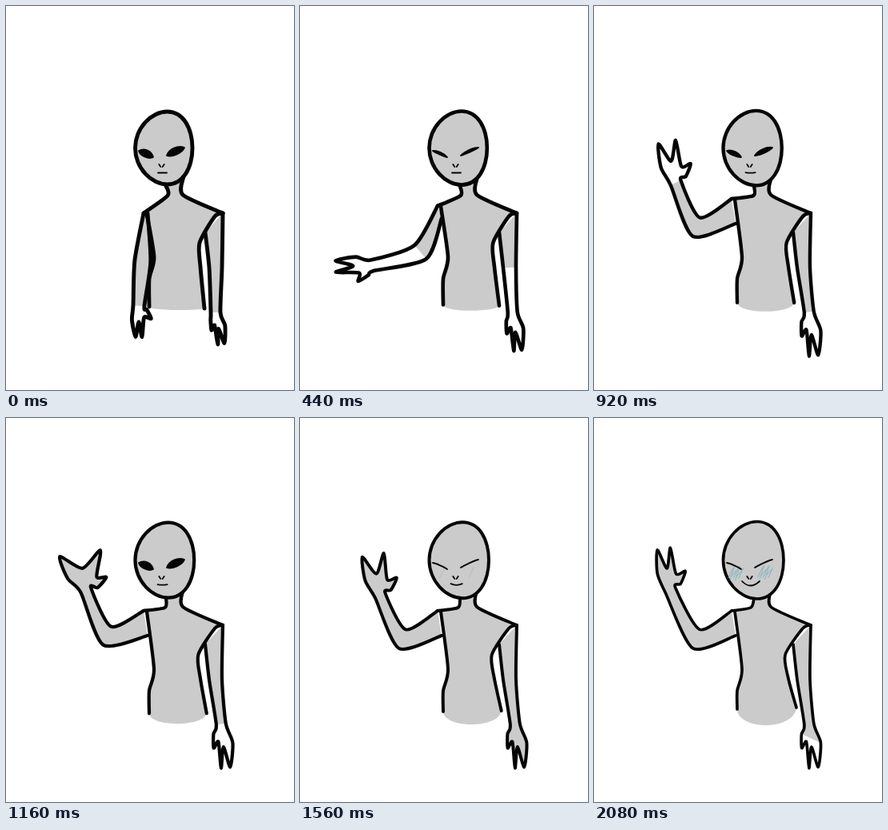
Recreate the animation shown at these times as an HTML page with a canvas. Size 360 by 480 pixels, loop 2.16 s.

```html
<!DOCTYPE html>
<html lang="en">
<head>
<meta charset="utf-8">
<title>Waving alien</title>
<style>
html, body { margin: 0; width: 100%; height: 100%; overflow: hidden; background: #fff; }
canvas { display: block; }
</style>
</head>
<body>
<canvas id="stage" width="360" height="480"></canvas>
<script>
const g = document.getElementById('stage').getContext('2d');
const LOOP = 2160, SKIN = '#cbcbcb', INK = '#050505';
// Where the white of an arm starts, counted along its outline.
const ELBOW = 1, WRIST = 2, FINGERS = 3, NONE = 99;

// Each drawing is held until the next step.
const steps = [0];
for (let t = 120; t < 280; t += 40) steps.push(t);
for (let t = 280; t <= 1640; t += 80) steps.push(t);
for (let t = 1680; t < 1760; t += 40) steps.push(t);
for (let t = 1760; t <= 2080; t += 80) steps.push(t);

// Angles in degrees: upper arm, forearm, hand; reach is the forearm length.
const keys = [
  { t: 0, upper: 92, fore: 95, reach: 56, hand: 90, spread: 6, open: 5, smile: 0, pale: [WRIST, WRIST] },
  { t: 280, upper: 95, fore: 117, reach: 54, hand: 100, spread: 9, open: 3.2, smile: 0, pale: [ELBOW, ELBOW] },
  { t: 600, upper: 133, fore: 212, reach: 71, hand: 257, spread: 9, open: 0, smile: 0, pale: [FINGERS, FINGERS] },
  { t: 920, upper: 157, fore: 245, reach: 61, hand: 258, spread: 12, open: 3, smile: .1, pale: [WRIST, WRIST] },
  { t: 1160, upper: 162, fore: 245, reach: 63, hand: 261, spread: 29, open: 5, smile: .1, pale: [NONE, WRIST] },
  { t: 1560, upper: 157, fore: 243, reach: 61, hand: 260, spread: 15, open: 0, smile: .3, pale: [NONE, NONE] },
  { t: 1760, upper: 162, fore: 245, reach: 63, hand: 261, spread: 29, open: 0, smile: .55, pale: [NONE, FINGERS] },
  { t: 2080, upper: 157, fore: 242, reach: 69, hand: 261, spread: 9, open: 0, smile: 1, pale: [NONE, FINGERS] }
];

const lerp = (a, b, k) => a + (b - a) * k;

function poseAt(t) {
  let i = 0;
  while (i < keys.length - 2 && t >= keys[i + 1].t) i++;
  const a = keys[i], b = keys[i + 1], k = (t - a.t) / (b.t - a.t);
  const p = { pale: k < 1 ? a.pale : b.pale };
  for (const n in a) if (n !== 'pale') p[n] = lerp(a[n], b[n], k);
  p.drift = t / 2080;
  p.lift = Math.sin(Math.min(1, (p.upper - 92) / 65) * Math.PI / 2);
  return p;
}

function polar([x, y], angle, r) {
  const a = angle * Math.PI / 180;
  return [x + r * Math.cos(a), y + r * Math.sin(a)];
}

// Smooth path through points.
function curve(path, pts, closed, join) {
  const n = pts.length;
  const at = i => closed ? pts[(i + n) % n] : pts[Math.max(0, Math.min(n - 1, i))];
  const s = closed ? 6 : 8;
  path[join ? 'lineTo' : 'moveTo'](...pts[0]);
  for (let i = 0; i < (closed ? n : n - 1); i++) {
    const [a, b, c, d] = [at(i - 1), at(i), at(i + 1), at(i + 2)];
    path.bezierCurveTo(b[0] + (c[0] - a[0]) / s, b[1] + (c[1] - a[1]) / s,
      c[0] - (d[0] - b[0]) / s, c[1] - (d[1] - b[1]) / s, ...c);
  }
  return path;
}

function fill(path, color) {
  g.fillStyle = color;
  g.fill(path);
}

function ink(pts, closed) {
  g.stroke(curve(new Path2D(), pts, closed));
}

// Two fingers and a thumb, from the outer side of the wrist to the inner one.
function handOutline(wrist, h, side) {
  const fingers = [
    { off: h.spread, len: h.size },
    { off: -h.spread, len: h.size },
    { off: h.thumb, len: h.size * .57 }
  ].sort((a, b) => side * (b.off - a.off));
  const at = (off, r) => polar(wrist, h.dir + off, r);
  const knuckle = (f, s) => at(f.off + s * 20, f.len * .5);
  const pts = [knuckle(fingers[0], side)];
  fingers.forEach((f, i) => {
    pts.push(at(f.off, f.len));
    const next = fingers[i + 1];
    if (next) pts.push(at((f.off + next.off) / 2, (f.len + next.len) * .26));
  });
  pts.push(knuckle(fingers[2], -side));
  return pts;
}

// Outline from joint to armpit; side is 1 for the waving arm, -1 for the other.
function limb(a, side) {
  const elbow = polar(a.shoulder, a.upper, a.length);
  const wrist = polar(elbow, a.fore, a.reach);
  const bend = (a.upper + a.fore) / 2 + 90, turn = a.fore + 90;
  return [
    a.joint,
    polar(elbow, bend, side * a.wide),
    polar(wrist, turn, side * a.thin),
    ...handOutline(wrist, a.hand, side),
    polar(wrist, turn, -side * a.thin),
    polar(elbow, bend, -side * a.wide),
    a.pit
  ];
}

function fillLimb(pts, pale) {
  fill(curve(new Path2D(), pts), SKIN);
  const white = pts.slice(pale, -pale);
  if (white.length > 2) fill(curve(new Path2D(), white), '#fff');
}

function wavingArm(p, joint) {
  return limb({
    shoulder: [173, 257], joint, pit: [177, 259 + 13 * p.lift],
    upper: p.upper, length: 62 - 13 * p.lift, fore: p.fore, reach: p.reach,
    wide: 10 + 2.5 * p.lift, thin: 7,
    hand: {
      dir: p.hand, spread: p.spread, size: 39 + 14 * p.lift,
      thumb: (38 + p.spread) * (p.upper > 114 ? 1 : -1)
    }
  }, 1);
}

function restingArm(p, joint) {
  const sink = Math.min(1, p.drift * 2.6);
  return limb({
    shoulder: [262, 265], joint, pit: [249, 283],
    upper: 90, length: 62, fore: 90 - 7 * sink, reach: 56,
    wide: 8, thin: 6,
    hand: { dir: 80 + 4 * sink, spread: 6, size: 40 + 15 * sink, thumb: 23 }
  }, -1);
}

function torso(p) {
  const d = p.drift, y = 259 - 18 * p.lift;
  return {
    nape: [[200, 225], [202 - 6 * d, 237], [172, y]],
    left: [[176, y + 1], [185, 314], [179, 341], [179, 376 - 12 * d]],
    right: [[248 + 5 * d, 378 - 16 * d], [243, 326], [242 - 3 * d, 296], [261, 263], [271, 259]],
    neck: [[271, 259], [221, 236], [222, 213]],
    floor: 380 + 4 * d
  };
}

function fillTorso(b) {
  const path = new Path2D();
  const l = b.left[3], r = b.right[0];
  const drop = y => b.floor + (b.floor - y) / 3;
  curve(path, b.nape);
  curve(path, b.left, false, true);
  path.bezierCurveTo(l[0] + 1, drop(l[1]), r[0] - 3, drop(r[1]), ...r);
  curve(path, b.right, false, true);
  curve(path, b.neck, false, true);
  fill(path, SKIN);
}

function eye(x0, y0, x1, y1, open) {
  const dx = x1 - x0, dy = y1 - y0, len = Math.hypot(dx, dy);
  const at = (k, h) => [lerp(x0, x1, k) - dy / len * h, lerp(y0, y1, k) + dx / len * h];
  const up = -1 - open * 1.1, down = -1 + open * 1.2;
  const path = new Path2D();
  path.moveTo(x0, y0);
  path.bezierCurveTo(...at(.25, up), ...at(.75, up), x1, y1);
  path.bezierCurveTo(...at(.8, down), ...at(.2, down), x0, y0);
  fill(path, INK);
  g.lineWidth = 1.8;
  g.stroke(path);
}

function cheek(x, y, amount) {
  g.strokeStyle = '#84b3bd';
  g.lineWidth = 1;
  g.globalAlpha = Math.min(1, .3 + amount);
  const count = Math.round(7 * amount);
  for (let i = 0; i < count; i++) {
    const cx = x + (i - (count - 1) / 2) * 2.2, h = 6 + 3 * Math.sin(i * 2.1);
    g.beginPath();
    g.moveTo(cx - 2.5, y + h);
    g.lineTo(cx + 3, y - h);
    g.stroke();
  }
  g.globalAlpha = 1;
  g.strokeStyle = INK;
}

function face(p) {
  const d = p.drift, s = p.smile;
  const x0 = 161.5, x1 = 233 + 4 * d, y0 = 132 - 2.5 * d, y1 = 223 + 3 * d;
  const skull = [];
  for (let i = 0; i < 16; i++) {
    const a = i * Math.PI / 8, v = Math.sin(a);
    skull.push([lerp(x0, x1, .5 + .5 * Math.cos(a) + .06 * v * v), lerp(y0, y1, .5 + .5 * v)]);
  }
  fill(curve(new Path2D(), skull, true), SKIN);
  ink(skull, true);

  const blush = (s - .15) / .85;
  if (blush > 0) {
    cheek(177, 194, blush);
    cheek(214, 193, blush);
  }
  eye(166, 181, 184, 189, p.open);
  eye(201, 187, 223, 177, p.open);

  g.lineWidth = 1.8;
  g.beginPath();
  for (const side of [-1, 1]) {
    g.moveTo(194.5 + 3.2 * side, 198);
    g.lineTo(194.5 + 1.2 * side, 201);
  }
  const y = 208.5 - 4.5 * s;
  g.moveTo(190 - 5 * s, y);
  g.quadraticCurveTo(195.5, y + 11 * s, 201 + 6 * s, y);
  g.stroke();
}

function draw(p) {
  g.fillStyle = '#fff';
  g.fillRect(0, 0, 360, 480);
  g.lineCap = g.lineJoin = 'round';
  g.strokeStyle = INK;
  g.lineWidth = 4.9 - 1.2 * p.drift;

  const body = torso(p);
  const wave = wavingArm(p, body.nape[2]);
  const rest = restingArm(p, body.neck[0]);
  fillTorso(body);
  fillLimb(wave, p.pale[0]);
  fillLimb(rest, p.pale[1]);
  for (const line of [wave, rest, body.nape, body.left, body.right, body.neck]) ink(line);
  face(p);
}

let shown = -1;
function tick() {
  const t = (performance.now() - start) % LOOP;
  const step = steps.filter(s => s <= t).pop();
  if (step !== shown) draw(poseAt(shown = step));
  requestAnimationFrame(tick);
}
const start = performance.now();
tick();
</script>
</body>
</html>
```
